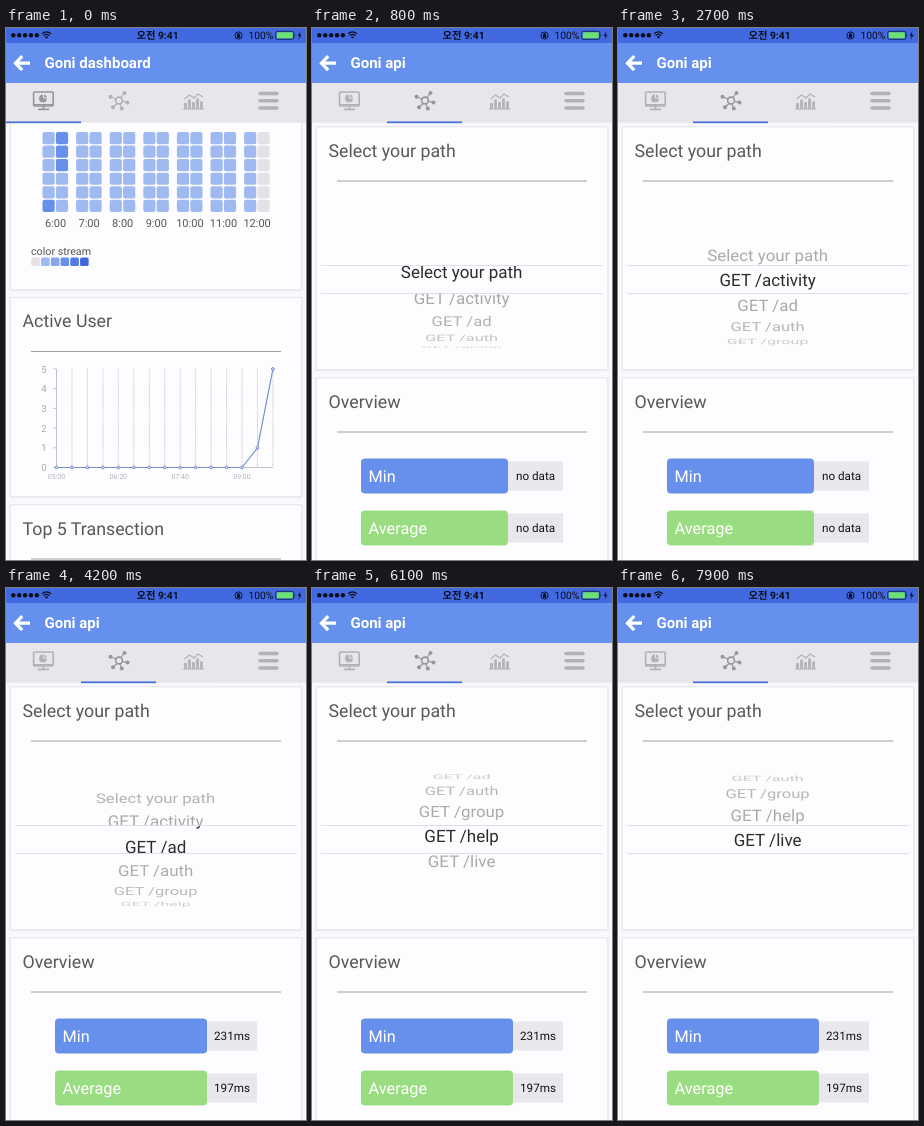
Write an HTML page that moves like this. It is 300 px wide and 532 px high and loops after 8000 ms.

```html
<!DOCTYPE html>
<html lang="ko">
<head>
<meta charset="utf-8">
<title>Goni</title>
<style>
  html, body { margin: 0; height: 100%; overflow: hidden; background: #fafafd; }
  svg { display: block; width: 100vw; height: 100vh; }
  text { font-family: Roboto, "Noto Sans CJK KR", "Noto Sans CJK", sans-serif; text-rendering: geometricPrecision; }
  .mid { text-anchor: middle; }
  .heading { font-size: 17.8px; fill: #58585a; }
  .small { font-size: 11px; fill: #555; }
  .value { font-size: 11.7px; fill: #111; text-anchor: middle; }
  .row { font-size: 17px; text-anchor: middle; }
  .icon { color: #b3b1b5; fill: none; stroke: currentColor; stroke-width: 1.6; }
  .icon.active { color: #98969b; }
  .solid { fill: currentColor; stroke: none; }
</style>
</head>
<body>
<svg viewBox="0 0 300 532" preserveAspectRatio="none">
  <defs>
    <clipPath id="content"><rect y="94" width="300" height="438"/></clipPath>
    <clipPath id="drumClip"><path d="M9 181H291V238H9ZM9 265H291V322H9Z"/></clipPath>
    <clipPath id="bandClip"><rect x="9" y="238" width="282" height="27"/></clipPath>
  </defs>
  <rect width="300" height="532" fill="#f9f9fc"/>
  <g clip-path="url(#content)">
    <g id="pages">
      <g id="dashboard"></g>
      <g id="api" transform="translate(300)"></g>
    </g>
  </g>

  <rect width="300" height="15" fill="#4269e0"/>
  <rect y="15" width="300" height="40" fill="#6590ee"/>
  <rect y="55" width="300" height="39.7" fill="#e8e6ea"/>
  <rect id="underline" y="93.4" width="75" height="1.8" fill="#4a72d6"/>

  <g id="status" fill="#0b0f1c">
    <g id="signal"></g>
    <path d="M36 5.8Q40.5 2 45 5.8M37.6 7.6Q40.5 5.2 43.4 7.6" fill="none" stroke="#0b0f1c" stroke-width="1.2"/>
    <path d="M38.7 8.8Q40.5 7.5 42.3 8.8L40.5 10.8Z"/>
    <text class="mid" x="151.5" y="11" font-size="10.3" font-weight="700">오전 9:41</text>
    <circle cx="232.5" cy="7.5" r="3.6" fill="none" stroke="#0b0f1c" stroke-width=".9"/>
    <path d="M231 7h3v2.4h-3ZM231.5 7v-.8a1 1 0 0 1 2 0V7" stroke="#0b0f1c" stroke-width=".4"/>
    <text x="242.5" y="11.2" font-size="10.3">100%</text>
    <rect x="269.8" y="3.3" width="18" height="8" rx="1.5" fill="none" stroke="#0b0f1c" stroke-width=".7"/>
    <rect x="270.8" y="4.3" width="16" height="6" rx=".7" fill="#6ce070"/>
    <path d="M288.6 5.8q1.3 1.5 0 3ZM294.6 3l-3 4.8h2L292.4 12l3.2-5.2h-2Z"/>
  </g>

  <path d="M24 35.2H10M16.2 28.2L9.5 35.2L16.2 42.2" fill="none" stroke="#fff" stroke-width="3.2"/>
  <text id="title" x="38.5" y="40.2" font-size="15" font-weight="700" fill="#fff"></text>

  <g class="icon">
    <rect x="27.6" y="64" width="19.6" height="14" rx="1"/>
    <path d="M32 81.4H43M37.5 77.5V81M28 76.8H47"/>
    <circle class="solid" cx="37" cy="70.4" r="3.9"/>
    <path d="M37.5 70V65.7M37.5 70H42" stroke="#e8e6ea" stroke-width="1"/>
  </g>
  <g class="icon">
    <circle cx="113" cy="72.5" r="3.4"/>
    <path d="M110 71L105 69M115 69.5L118 65.5M116.4 73.3L121 74.3M111 75.5L107.5 79M114 76L115.5 80" stroke-width="1.2"/>
    <g class="solid">
      <circle cx="104.5" cy="68.8" r="2"/><circle cx="118.5" cy="65" r="2"/><circle cx="121.5" cy="74.5" r="2"/>
      <circle cx="107" cy="79.3" r="2"/><circle cx="115.8" cy="80.5" r="2"/>
    </g>
  </g>
  <g class="icon">
    <path d="M179.5 81V75M183.5 81V71.5M187.5 81V74M191.5 81V70.5M195.5 81V73.5" stroke-width="2.7"/>
    <path d="M177 81H198" stroke-width="1"/>
    <path d="M178.5 71L183.5 67L188 70L192 66L197 69" stroke-width="1.1"/>
  </g>
  <g class="icon">
    <path d="M254 65.5H271M254 72.7H271M254 79.9H271" stroke-width="3.5" stroke-linecap="round"/>
  </g>
</svg>
<script>
const $ = id => document.getElementById(id);
const all = selector => [...document.querySelectorAll(selector)];
const times = (n, f) => Array.from({ length: n }, (_, i) => f(i)).join('');
const rect = (x, y, w, h, fill, r = 0) =>
  `<rect x="${x}" y="${y}" width="${w}" height="${h}" rx="${r}" fill="${fill}"/>`;
const text = (x, y, s, cls, extra = '') => `<text x="${x}" y="${y}" class="${cls}" ${extra}>${s}</text>`;
const path = (d, stroke, w = 1, extra = '') =>
  `<path d="${d}" fill="none" stroke="${stroke}" stroke-width="${w}" ${extra}/>`;
const card = (y, h) =>
  rect(3.2, y - .3, 293.8, h + 1.6, '#ececf1', 2) + rect(4, y, 292, h, '#e3e3e9', 2) + rect(4.7, y + .7, 290.6, h - 1.4, '#fdfdff', 1.5);
const section = (y, h, title) =>
  card(y, h) + text(16.5, y + 30.1, title, 'heading') + path(`M25 ${y + 54.5}H275`, '#a0a0a2');

$('signal').innerHTML = times(5, i => `<circle cx="${7.3 + i * 5.9}" cy="7.2" r="2.2"/>`);

// Dashboard page
const shades = ['#e4e2e6', '#9fbaf0', '#86a6ef', '#6790ec', '#507ce3', '#3f68da'];
function heatShade(col, row) {
  if (col === 13) return 0;
  return (col === 1 && row < 3) || (col === 0 && row === 5) ? 3 : 1;
}
const heatmap = times(14, col => times(6, row => rect(
  36.5 + (col >> 1) * 33.6 + (col & 1) * 13.4, 104 + row * 13.55, 12.2, 12.2,
  shades[heatShade(col, row)], 2)));
const chartX = i => 50.5 + i * 15.46;
const chartY = v => 439.5 - v * 19.7;
const users = i => [0, 1, 5][Math.max(0, i - 12)];
const clock = ['05:00', '06:20', '07:40', '09:00'];

$('dashboard').innerHTML =
  card(60, 202) + heatmap +
  times(7, i => text(49.5 + i * 33.6, 198.5, `${6 + i}:00`, 'small mid')) +
  text(25, 226.5, 'color stream', 'small', 'style="font-size:10.7px"') +
  times(6, i => rect(25.3 + i * 9.75, 229.6, 8.6, 8.4, shades[i], 1.5)) +
  section(269, 200, 'Active User') +
  times(14, i => path(`M${chartX(i + 1)} 341V439.5`, '#bdbdc2', .8, 'stroke-dasharray="1.5 1"')) +
  path(`M${chartX(0)} 341V439.5H${chartX(14)}`, '#bcbcc0', .9) +
  times(6, v => path(`M47 ${chartY(v)}h3.5`, '#bcbcc0', .8) +
    text(38, chartY(v) + 3.5, v, 'mid', 'font-size="9.6" fill="#a9a9ad"')) +
  times(4, i => text(chartX(i * 4), 450.5, clock[i], 'mid', 'font-size="7" fill="#b4b4b8"')) +
  path('M' + Array.from({ length: 15 }, (_, i) => `${chartX(i)} ${chartY(users(i))}`).join('L'), '#7590cc', 1.2) +
  times(15, i => `<circle cx="${chartX(i)}" cy="${chartY(users(i))}" r="1.4" fill="#dce5f8" stroke="#6884c4" stroke-width=".9"/>`) +
  section(476.5, 200, 'Top 5 Transection');

// API page
const options = ['Select your path', ...['activity', 'ad', 'auth', 'group', 'help', 'live'].map(s => 'GET /' + s)];
const wheelRows = options.map(s => text(0, 6, s, 'row')).join('');
const bar = (y, label, color) =>
  `<rect class="bar" x="49" y="${y}" height="35" rx="4" fill="${color}"/>` +
  text(56.6, y + 23.6, label, '', 'font-size="16.3" fill="#fff"') +
  `<rect class="box" y="${y + 3}" height="29" fill="#e9e7ec"/>` + text(0, y + 21.6, '', 'value');

$('api').innerHTML =
  section(98.5, 243.5, 'Select your path') +
  `<g clip-path="url(#drumClip)"><g id="drum" fill="#a6a6a8">${wheelRows}</g></g>
   <g clip-path="url(#bandClip)"><g id="band" fill="#2c2c2e">${wheelRows}</g></g>` +
  path('M9 237.5H291M9 265.5H291', '#dedee2', .9) +
  section(349.5, 250, 'Overview') +
  bar(430.5, 'Min', '#6790ec') + bar(482.5, 'Average', '#99dc82');

const icons = all('.icon');
const [bars, boxes, values] = ['.bar', '.box', '.value'].map(all);

// [time, selected row]
const scrollKeys = [[0, 0], [550, 0], [800, .28], [1200, .82], [1500, .97], [1800, 1], [3600, 1], [3800, 1.1],
  [4200, 1.75], [5000, 3.11], [6100, 5.15], [6500, 5.75], [6800, 5.97], [7000, 6], [8000, 6]];
function scrollAt(t) {
  const i = scrollKeys.findIndex(k => k[0] > t);
  const [t0, p0] = scrollKeys[i - 1], [t1, p1] = scrollKeys[i];
  return p0 + (p1 - p0) * (t - t0) / (t1 - t0);
}

// Rows lie on a drum; the selection band shows a flat list.
function turnWheel(pos) {
  const x = 149.6, y = 252, radius = 68, step = 21.5 * Math.PI / 180, rowHeight = 28;
  [...$('drum').children].forEach((row, i) => {
    const angle = (i - pos) * step, c = Math.cos(angle);
    row.setAttribute('visibility', Math.abs(angle) < 1.5 ? 'visible' : 'hidden');
    row.setAttribute('opacity', .3 + .7 * Math.max(0, c));
    row.setAttribute('transform', `translate(${x} ${y + radius * Math.sin(angle)}) scale(${.91 + .09 * c} ${Math.max(c, .01)})`);
  });
  [...$('band').children].forEach((row, i) =>
    row.setAttribute('transform', `translate(${x} ${y + (i - pos) * rowHeight})`));
}

function showValues(loaded) {
  const split = loaded ? 201 : 196;
  bars.forEach(b => b.setAttribute('width', split - 49));
  boxes.forEach(b => { b.setAttribute('x', split); b.setAttribute('width', 251 - split); });
  values.forEach((v, i) => {
    v.setAttribute('x', (split + 251) / 2);
    v.textContent = loaded ? ['231ms', '197ms'][i] : 'no data';
  });
}

function draw(now) {
  const t = now % 8000;
  const slide = 1 - (1 - Math.min(1, Math.max(0, (t - 100) / 350))) ** 3;
  const tab = t < 150 ? 0 : 1;
  $('pages').setAttribute('transform', `translate(${-300 * slide})`);
  $('underline').setAttribute('x', 75 * slide);
  $('title').textContent = ['Goni dashboard', 'Goni api'][tab];
  icons.forEach((icon, i) => icon.classList.toggle('active', i === tab));
  turnWheel(scrollAt(t));
  showValues(t >= 3000);
}

const start = performance.now();
function tick() {
  draw(performance.now() - start);
  requestAnimationFrame(tick);
}
tick();
</script>
</body>
</html>
```
